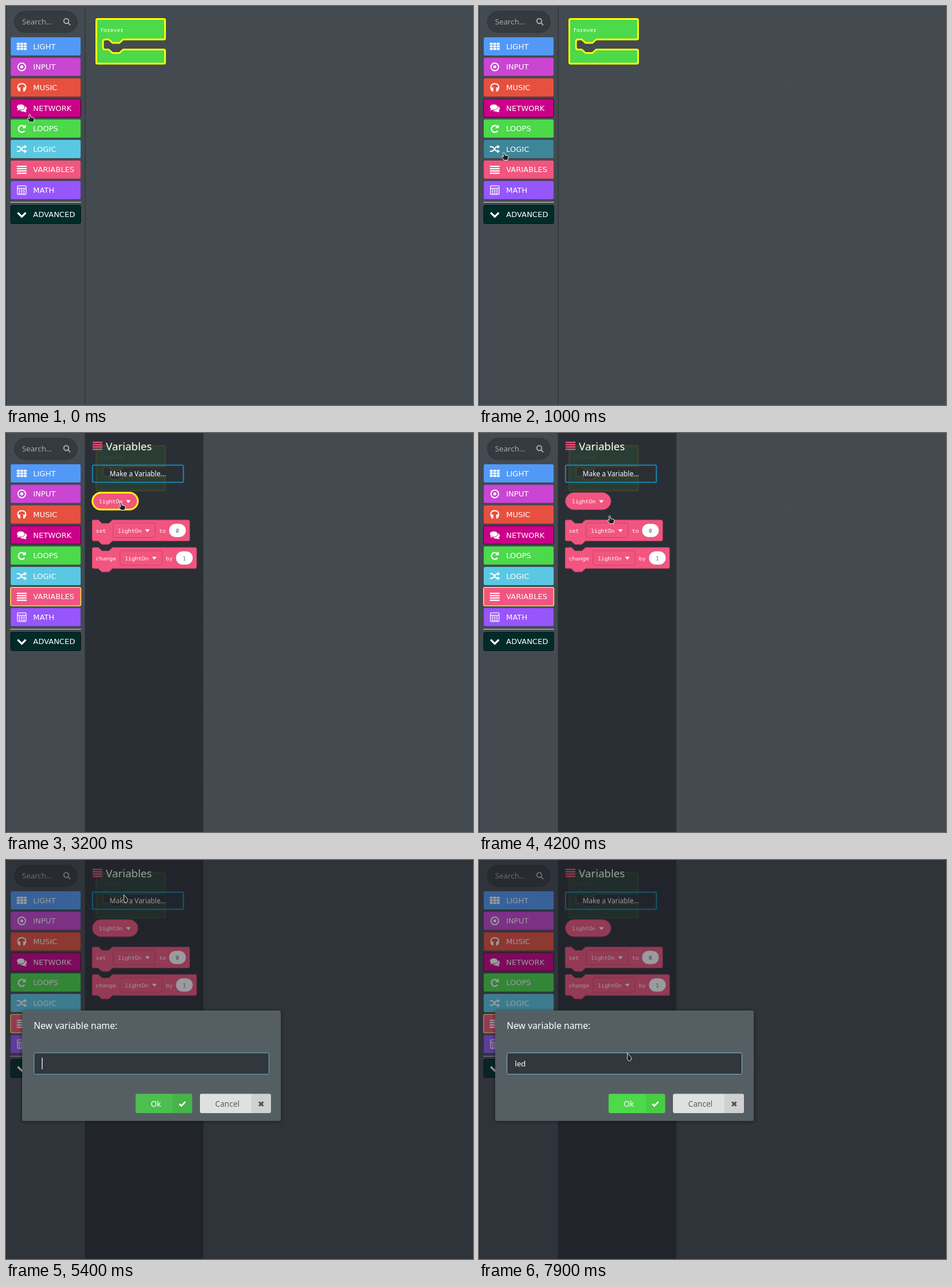
Recreate the animation shown at these times as an HTML page. Size 809 by 692 pixels, loop 8 s.

```html
<!DOCTYPE html>
<html>
<head>
<meta charset="utf-8">
<style>
html, body { margin: 0; width: 100%; height: 100%; overflow: hidden; background: #434a50; }
svg { display: block; width: 809px; height: 692px; }
text { white-space: pre; }
.menu { font: 13px "DejaVu Sans", sans-serif; fill: #fff; }
.ui { font-family: "Noto Sans", "Open Sans", sans-serif; fill: #fff; }
.mono { font: 9.8px "Noto Sans Mono", "DejaVu Sans Mono", monospace; fill: #fff; }
.line { fill: none; stroke: #fff; }
</style>
</head>
<body>
<svg id="stage" viewBox="0 0 809 692"></svg>
<script>
const LOOP = 8000, STEP = 100;
const OPEN = 1900, PRESS = 5300, ASK = 5400;
const PINK = '#f2557f', GREEN = '#4cd94a', YELLOW = '#ffff00';
const stage = document.getElementById('stage');

// Icons are drawn around their own centre.
const bars = color => [-6, -2, 2, 6].map(y =>
  `<rect x="-8.5" y="${y - 1.1}" width="17" height="2.2" fill="${color}"/>`).join('');

const cells = (x0, y0, dx, dy, w, h) => [0, 1, 2].map(r => [0, 1, 2].map(c =>
  `<rect x="${x0 + c * dx}" y="${y0 + r * dy}" width="${w}" height="${h}" rx=".6" fill="#fff"/>`).join('')).join('');

const icons = {
  grid: cells(-8.5, -6.3, 6, 4.5, 5, 3.6),
  target: '<circle r="6.6" class="line" stroke-width="2"/><circle r="2.6" fill="#fff"/>',
  phones: '<path class="line" stroke-width="2" d="M-5 4.5C-9-1-6-6.5 0-6.5S9-1 5 4.5"/>' +
    '<path fill="#fff" d="M-5.5 0h3v7h-2.2l-2.3-3zM5.5 0h-3v7h2.2l2.3-3z"/>',
  chat: '<path fill="#fff" d="M3.5 6.3C-.5 6.5-3 5-3.5 4 4 4 7-.5 5.8-3.2 9-2 10 2.5 6.5 4.6L8.6 7.2Q5.5 7.4 3.5 6.3Z"/>' +
    '<path fill="#fff" d="M-2-6C2.5-6 5-4 5-1.4S1.8 3 -2 3L-4 2.8Q-6 4.4-8 4.4L-6.3 1.9C-10-1-8.5-6-2-6Z"/>',
  turn: '<path class="line" stroke-width="2.4" d="M4.2-3.8A5.8 5.8 0 1 0 4.8 3.6"/>' +
    '<path fill="#fff" d="M7-7.5V-1H.6Z"/>',
  mix: '<path class="line" stroke-width="2" d="M-8.5-4H-5.5C-1-4 0 4 4.5 4H6M-8.5 4H-5.5C-1 4 0-4 4.5-4H6"/>' +
    '<path fill="#fff" d="M4.5-7.3L9-4 4.5-.7ZM4.5.7L9 4 4.5 7.3Z"/>',
  bars: bars('#fff'),
  calc: '<rect x="-7.5" y="-7.5" width="15" height="15" rx="1" class="line" stroke-width="1.3"/>' +
    '<path class="line" stroke-width="1.5" d="M-7-3H7"/>' + cells(-5.2, -1, 3.9, 2.8, 2.6, 1.8),
  down: '<path class="line" stroke-width="3.2" d="M-7-3L0 4 7-3"/>'
};

const rows = [
  ['LIGHT', '#5299f7', 'grid'], ['INPUT', '#c945d2', 'target'],
  ['MUSIC', '#e7503e', 'phones'], ['NETWORK', '#cc0088', 'chat'],
  ['LOOPS', GREEN, 'turn'], ['LOGIC', '#5bc8e3', 'mix'],
  ['VARIABLES', PINK, 'bars'], ['MATH', '#9756fb', 'calc'],
  ['ADVANCED', '#002b28', 'down']
].map(([label, color, icon], i) => ({
  label, color, icon, y: i < 8 ? 54 + i * 35.62 : 345.5,
  plain: label === 'NETWORK' || label === 'ADVANCED'
}));

const rect = (x, y, w, h, rx, rest) =>
  `<rect x="${x}" y="${y}" width="${w}" height="${h}" rx="${rx}" ${rest}/>`;
const label = (cls, x, y, str, rest = '') =>
  `<text class="${cls}" x="${x}" y="${y}" ${rest}>${str}</text>`;
const size = (px, rest = '') => `style="font-size:${px}px;${rest}"`;
const at = (x, y, body) => `<g transform="translate(${x} ${y})">${body}</g>`;
const arrow = (x, y) => `<path fill="#fff" d="M${x} ${y}h8l-4 5z"/>`;

const rowSvg = (r, i) =>
  rect(8, r.y, 121.5, 32, 2.5, `id="row${i}" stroke="#000" stroke-opacity="${r.plain ? .65 : .16}"`) +
  at(27.3, r.y + (r.icon === 'bars' || r.icon === 'turn' ? 16.4 : 16), icons[r.icon]) +
  label('menu', 47, r.y + 20.7, r.label);

// A statement block with a variable field and a number slot.
function statement(id, y, w, word, field, join, num) {
  const r = 149.5 + w;
  return `<path id="${id}" fill="${PINK}" stroke-linejoin="round" d="M151.5 ${y}H160l6.5 6h11.5l6.5-6H${r - 2}q2 0 2 2v32q0 2-2 2H184.5l-6.5 6H166l-6.5-6H151.5q-2 0-2-2v-32q0-2 2-2z"/>` +
    label('mono', 155.5, y + 21.8, word) +
    rect(field, y + 5, 73, 25.5, 3.5, 'fill="none" stroke="#c4446a"') +
    label('mono', field + 8.2, y + 21.8, 'lightOn') + arrow(field + 55.5, y + 16) +
    label('mono', field + 79.5, y + 21.8, join) +
    rect(r - 36, y + 6, 30, 24, 12, 'fill="#fff" stroke="#c4446a" stroke-width=".7"') +
    label('mono', r - 21, y + 21.8, num, 'text-anchor="middle" style="fill:#575e75"');
}

const forever =
  `<path fill="${GREEN}" stroke="${YELLOW}" stroke-width="3" stroke-linejoin="round" d="M158.5 22.5H273.5q2 0 2 2V56q0 2-2 2H203l-6.5 6H184.5l-6.5-6H172q-4 0-4 4v9.5q0 4 4 4h6l6.5 6h12l6.5-6H273.5q2 0 2 2V98q0 2-2 2H158.5q-2 0-2-2V24.5q0-2 2-2z"/>` +
  label('mono', 162.8, 44.6, 'forever');

const flyout =
  rect(137, 0, 205, 692, 0, 'fill="#272d32" fill-opacity=".9"') +
  at(158.5, 22.3, bars(PINK)) +
  label('ui', 173, 29.7, 'Variables', size(18.6, 'font-weight:500')) +
  rect(149.9, 55.8, 157.4, 29.6, 2, 'id="make" stroke="#1487b0" stroke-width="2"') +
  label('ui', 179.6, 74.6, 'Make a Variable...', size(11.8)) +
  rect(149.8, 103.6, 78.6, 29.2, 14.6, `id="pill" fill="${PINK}"`) +
  label('mono', 160.8, 122.2, 'lightOn') + arrow(208, 116.5) +
  statement('set', 151, 168.5, 'set', 185.5, 'to', 0) +
  statement('change', 198.8, 180.5, 'change', 197.5, 'by', 1);

const dialog =
  rect(0, 0, 809, 692, 0, 'fill="#17191f" fill-opacity=".43"') +
  rect(28, 261, 448, 191.5, 3.5, 'fill="#545e63" filter="url(#shade)"') +
  label('ui', 48, 293, 'New variable name:', size(15.6)) +
  rect(48.5, 334.5, 407, 37, 3, 'id="input" fill="#32373e"') +
  label('ui', 62, 357.6, '', size(13.2) + ' id="typed"') +
  '<rect id="caret" y="343" width="1.2" height="20" fill="#fff"/>' +
  rect(224.5, 405.5, 98, 33.5, 3, 'id="ok"') +
  rect(289, 405.5, 33.5, 33.5, 3, 'fill="#000" fill-opacity=".06"') +
  label('ui', 250.7, 427.5, 'Ok', size(13.6)) +
  '<path class="line" stroke-width="2.6" d="M300.3 423l3.4 3.4 7-7"/>' +
  rect(336, 405.5, 123, 33.5, 3, 'fill="#dfe1e0"') +
  rect(425, 405.5, 34, 33.5, 3, 'fill="#000" fill-opacity=".07"') +
  label('ui', 362.3, 427.5, 'Cancel', size(13.6, 'fill:#5b5f61')) +
  '<path stroke="#484c4f" stroke-width="2.8" d="M438.3 419.4l7.4 7.4m0-7.4l-7.4 7.4"/>';

stage.innerHTML =
  `<defs><pattern id="dots" x="142" y="11" width="14.9" height="14.9" patternUnits="userSpaceOnUse">
  <rect width="1.3" height="1.3" fill="#535b61"/></pattern>
  <filter id="shade" x="-5%" y="-10%" width="110%" height="120%">
  <feDropShadow dx="0" dy="1" stdDeviation="3" flood-color="#000" flood-opacity=".5"/></filter></defs>` +
  rect(0, 0, 809, 692, 0, 'fill="#434a50"') +
  rect(138, 0, 671, 692, 0, 'fill="url(#dots)"') +
  forever +
  rect(136.7, 0, 1, 692, 0, 'fill="#2b3136"') + rect(0, 0, 1, 692, 0, 'fill="#2f353a"') +
  rect(14.5, 9, 109, 37, 18.5, 'fill="#343a3f" stroke="#2d3338"') +
  label('ui', 27.8, 32, 'Search...', size(13.2, 'fill:#a7abae')) +
  '<g fill="none" stroke="#a7abae" stroke-width="2"><circle cx="104.4" cy="26" r="4.2"/><path d="M107.4 29.2l4 4.2"/></g>' +
  rows.map(rowSvg).join('') +
  rect(7.5, 339.8, 122.5, 1, 0, 'fill="#e4e6e7"') +
  `<g id="flyout">${flyout}</g><g id="dialog">${dialog}</g>` +
  '<g id="cursor"><path id="hand" fill="#1d2124" stroke="#fff" stroke-width="1" stroke-linejoin="round" d="M-1.3.8C-1.3-.7 1-.8 1.2.8L1.8 4.6 6.4 5.6C8 6 8.2 7.2 7.8 8.8L6.8 13.3H.2L-3.6 8.4C-4.4 7.2-3 6-1.8 6.9L-.6 7.8Z"/>' +
  '<path id="point" fill="#1d2124" stroke="#e8e8e4" stroke-width="1" stroke-linejoin="round" d="M0 .3V11L2.6 14.4 6.2 12.4 7 8.2Z"/></g>';

const $ = Object.fromEntries([...stage.querySelectorAll('[id]')].map(e => [e.id, e]));
const set = (el, props) => { for (const k in props) el.setAttribute(k, props[k]); };
const show = (el, on) => set(el, { visibility: on ? 'visible' : 'hidden' });

// Pointer path: time, x, y
const path = [
  [0, 41, 188], [300, 42, 108], [600, 43, 272], [900, 42, 230], [1000, 43, 254],
  [1300, 43, 310], [1600, 43, 310], [1700, 41.5, 280], [2100, 41.5, 280],
  [2200, 46, 308], [2400, 110, 290], [2700, 135, 150], [2900, 186, 117],
  [3100, 186, 117], [3200, 199, 120.5], [3900, 232, 165], [4100, 232, 165],
  [4600, 204, 60], [5500, 204, 60], [5800, 234, 204], [7600, 234, 204],
  [7700, 247, 256], [7800, 247, 256], [7900, 257, 334.5]
];

function pointer(t) {
  const i = path.findIndex(p => p[0] > t);
  if (i < 0) return path[path.length - 1].slice(1);
  const [a, x, y] = path[i - 1], [b, u, v] = path[i];
  const k = (t - a) / (b - a);
  return [x + (u - x) * k, y + (v - y) * k];
}

const mix = (a, b, k) => 'rgb(' + a.map((v, i) => Math.round(v + (b[i] - v) * k)) + ')';
const dark = hex => 'rgb(' + [1, 3, 5].map(i => Math.round(parseInt(hex.substr(i, 2), 16) * .67)) + ')';

function draw(now) {
  const t = Math.floor((now % LOOP) / STEP) * STEP;
  const [x, y] = pointer(t);
  const live = t < ASK, open = t >= OPEN;
  const over = (l, top, r, bottom) => live && x >= l && x <= r && y >= top && y <= bottom;

  rows.forEach((r, i) => {
    const hot = !r.plain && over(8, r.y, 130, r.y + 32);
    set($['row' + i], { fill: hot ? dark(r.color) : r.color });
  });
  set($.row6, open ? { stroke: '#ffe34d', 'stroke-opacity': 1, 'stroke-width': 1.6 }
    : { stroke: '#000', 'stroke-opacity': .16, 'stroke-width': 1 });

  show($.flyout, open);
  const press = live && t >= PRESS;
  set($.make, {
    fill: over(149, 55, 308, 86) ? '#118ab2' : '#272d32',
    'fill-opacity': over(149, 55, 308, 86) ? 1 : 0,
    'stroke-width': press ? 4 : 2, stroke: press ? '#118ab2' : '#1487b0'
  });
  const mark = (el, on) => set(el, { stroke: on ? YELLOW : '#d64b71', 'stroke-width': on ? 3 : 1 });
  mark($.pill, open && over(149, 103, 229, 133));
  mark($.set, open && over(149, 151, 318, 188));
  mark($.change, open && over(149, 199, 330, 235));

  show($.dialog, !live);
  const fade = Math.min(1, Math.max(0, (t - ASK) / 300));
  set($.ok, { fill: mix([75, 191, 79], [76, 217, 74], fade) });
  set($.input, { stroke: mix([114, 169, 189], [133, 183, 217], fade) });
  const n = [6700, 6900, 7100].filter(k => t >= k).length;
  $.typed.textContent = 'led'.slice(0, n);
  set($.caret, { x: n ? 62.3 + $.typed.getComputedTextLength() : 62 });
  set($.caret, { visibility: !live && t < 7700 ? 'visible' : 'hidden' });

  const arrowOn = t >= 4500;
  show($.hand, !arrowOn);
  show($.point, arrowOn);
  set($.cursor, { transform: `translate(${x} ${y})` });
}

const start = performance.now();
function tick() {
  draw(performance.now() - start);
  requestAnimationFrame(tick);
}
tick();
</script>
</body>
</html>
```
